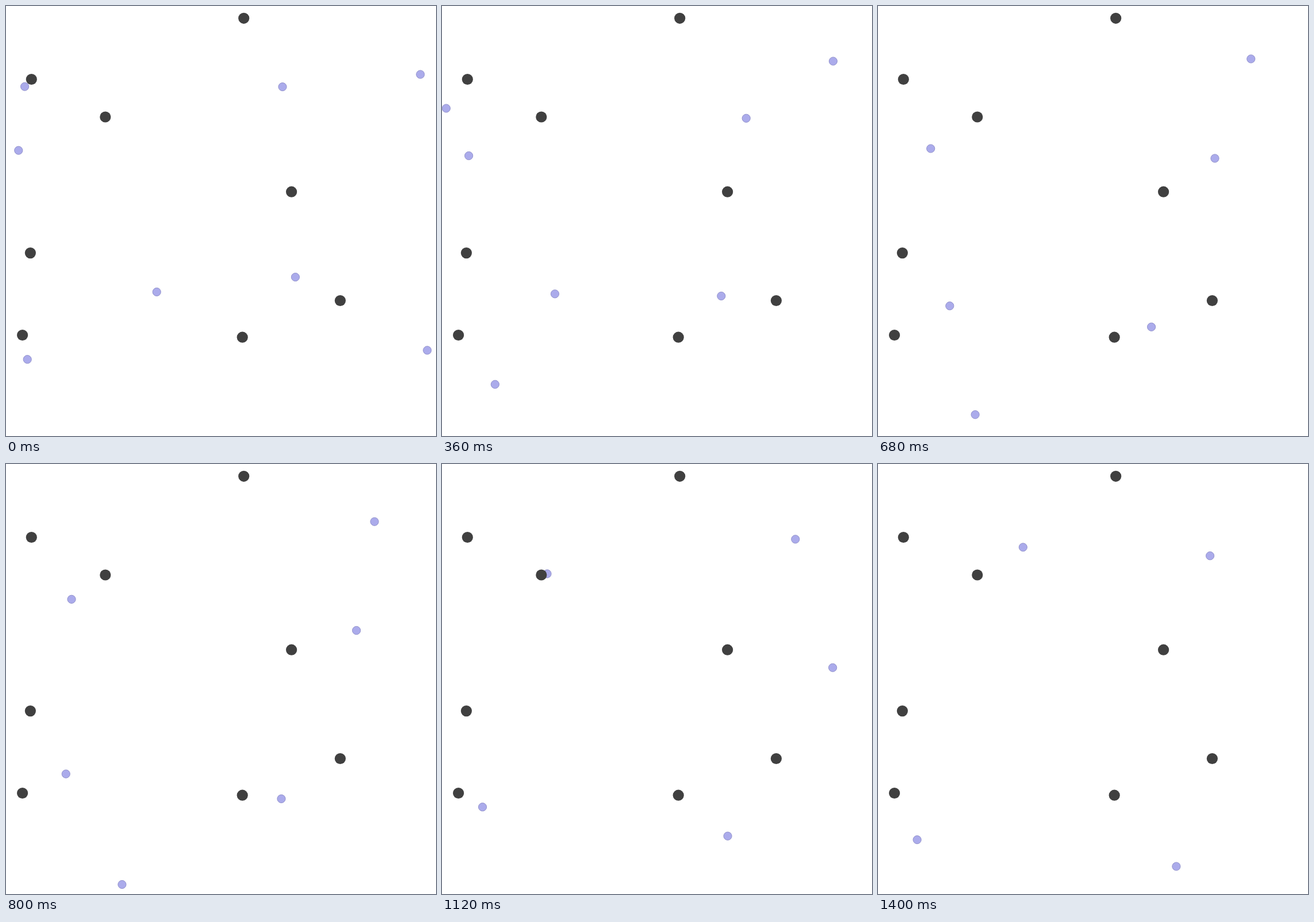
Recreate the animation shown at these times as an HTML page with a canvas. Size 748x748 px, loop 1.44 s.

```html
<!DOCTYPE html>
<html lang="en">
<head>
<meta charset="utf-8">
<title>Drifting particles</title>
<style>
  html, body { margin: 0; width: 100%; height: 100%; overflow: hidden; background: #fff; }
  canvas { display: block; width: 748px; height: 748px; }
</style>
</head>
<body>
<canvas id="stage" width="748" height="748"></canvas>
<script>
const SIZE = 748, LOOP = 1440, STEP = 40;
const RELAX = 80; // time constant of the start from rest
const ctx = document.getElementById("stage").getContext("2d");

const anchors = [
  [413.7, 21.3], [44.3, 127.5], [172.8, 193], [496.6, 323.2],
  [42.4, 429.6], [581.4, 512.5], [28.6, 572.5], [411.2, 576.2]
];

// Particles start at rest and approach the speed of the flow exponentially.
const drift = t => t - RELAX * (1 - Math.exp(-t / RELAX));

// Every path passes its key points at these moments; the last heading carries on.
const keys = [0, 360, 680, 960, 1400].map(drift);

const particles = [
  { path: [[32.6, 140.2], [7.3, 178], [-24, 240]] },
  { path: [[37.2, 614.7], [92.3, 658.2], [169.1, 710.8]] },
  { path: [[732.8, 598.9], [760, 638], [790, 683]] },
  { path: [[21.8, 251.2], [46.6, 260.5], [91.7, 248], [147.3, 213.9], [252.3, 144.8]] },
  { path: [[262.2, 497.4], [196.4, 500.8], [124.8, 521.7], [83.1, 567.4], [68.1, 653.6]] },
  { path: [[720.8, 119], [680.4, 96], [648.8, 92], [630.6, 115.8], [577.6, 159.7]] },
  { path: [[503.4, 471.6], [485.8, 504.5], [475.6, 558.3], [487.4, 615.7], [518.9, 700]] },
  { path: [[481, 140.6], [529.2, 195.3], [586, 265], [643.2, 321.6], [750, 412]], life: 1240 }
];

// Slope at key i of the parabola through its neighbours.
function tangent(values, i) {
  const m = Math.min(Math.max(i, 1), values.length - 2);
  const slope = k => (values[k + 1] - values[k]) / (keys[k + 1] - keys[k]);
  const bend = (slope(m) - slope(m - 1)) / (keys[m + 1] - keys[m - 1]);
  return slope(m - 1) + bend * (2 * keys[i] - keys[m - 1] - keys[m]);
}

function spline(values, s) {
  let i = 0;
  while (i < values.length - 2 && s > keys[i + 1]) i++;
  const span = keys[i + 1] - keys[i];
  const u = (s - keys[i]) / span, v = 1 - u;
  return values[i] * v * v * (1 + 2 * u) + values[i + 1] * u * u * (3 - 2 * u)
    + span * u * v * (tangent(values, i) * v - tangent(values, i + 1) * u);
}

function disc(x, y, radius, fill, stroke) {
  ctx.beginPath();
  ctx.arc(x, y, radius, 0, Math.PI * 2);
  ctx.fillStyle = fill;
  ctx.fill();
  if (stroke) {
    ctx.strokeStyle = stroke;
    ctx.stroke();
  }
}

function draw(t) {
  ctx.fillStyle = "#fff";
  ctx.fillRect(0, 0, SIZE, SIZE);
  for (const { path, life = LOOP } of particles) {
    if (t > life) continue;
    const [x, y] = [0, 1].map(axis => spline(path.map(p => p[axis]), drift(t)));
    disc(x, y, 7.1, "#ababeb", "#9292cc");
  }
  for (const [x, y] of anchors) disc(x, y, 9.6, "#404040");
}

const start = performance.now();
function tick() {
  const elapsed = (performance.now() - start) % LOOP;
  draw(Math.floor(elapsed / STEP) * STEP);
  requestAnimationFrame(tick);
}
tick();
</script>
</body>
</html>
```
